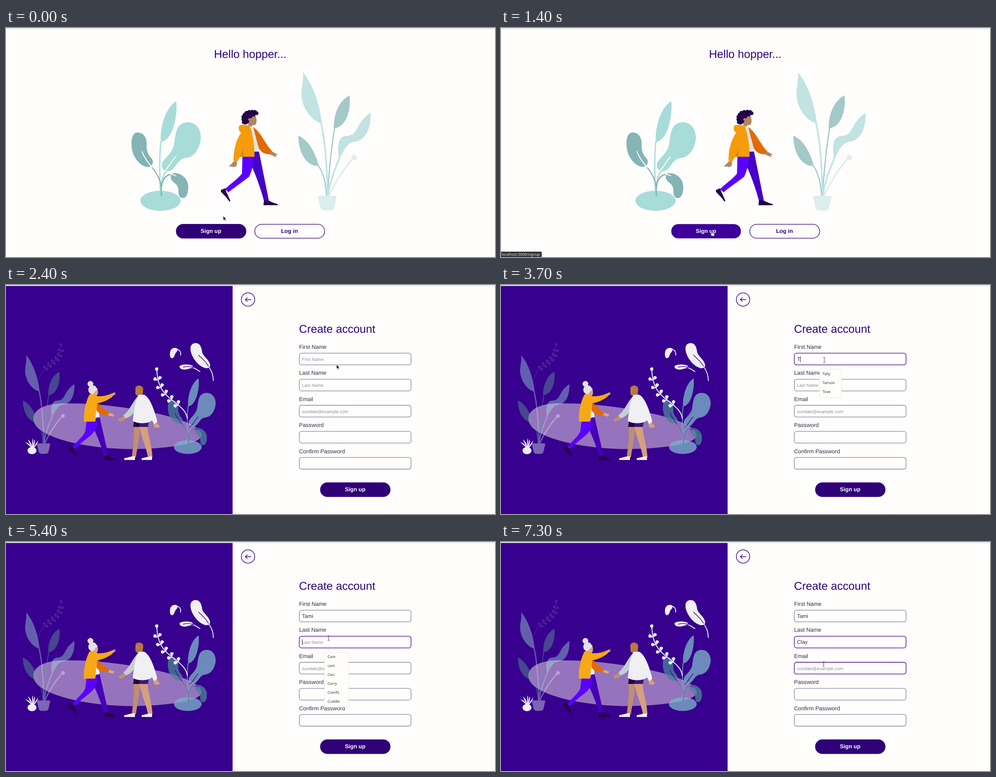
Recreate the animation shown at these times as an HTML page. Size 1092x513 px, loop 8000 ms.

```html
<!DOCTYPE html>
<html lang="en">
<head>
<meta charset="utf-8">
<title>Sign up flow</title>
<style>
html, body { margin: 0; width: 100%; height: 100%; overflow: hidden; background: #fffefd; }
svg { display: block; width: 1092px; height: 513px; font-family: "Liberation Sans", Arial, sans-serif; text-rendering: geometricPrecision; }
.title { font-size: 25.15px; fill: #300077; }
.label { font-size: 12.55px; fill: #2b2d42; }
.value { font-size: 11.85px; fill: #2b2d42; }
.hint { font-size: 9.87px; fill: #8b8f9d; }
.btn { font-size: 12.55px; font-weight: bold; text-anchor: middle; }
.small { font: 8.3px "Noto Sans", sans-serif; }
.line { fill: none; stroke-linecap: round; }
.home { --light: #a8dcd9; --deep: #84b4b4; --gap: #fffefd; --leaf: #c1e3e2; --dark: #a4c9c9; }
.join { --light: #7bb1c8; --deep: #4a829a; --gap: #37008e; --leaf: #9fe4d9; --dark: #5ba896; }
.lf { fill: var(--light); } .ls { stroke: var(--light); }
.df { fill: var(--deep); } .ds { stroke: var(--deep); }
.gs { stroke: var(--gap); }
.pf { fill: var(--leaf); } .ps { stroke: var(--leaf); }
.qf { fill: var(--dark); } .qs { stroke: var(--dark); }
</style>
</head>
<body>
<svg id="stage" viewBox="0 0 1092 513">
<defs>
  <g id="bush">
    <g class="line">
      <path class="ls" stroke-width="2.8" d="M346 254C342 285 343 325 345 372M360 318C350 330 346 342 346 372"/>
      <path class="ds" stroke-width="2.6" d="M322 307C334 321 345 338 346 355"/>
    </g>
    <ellipse class="lf" cx="345" cy="387" rx="45" ry="22.5"/>
    <path class="lf" d="M380 164C384 190 374 252 346 255C343 240 350 182 380 164Z"/>
    <path class="lf" d="M406 211C426 212 436 228 435 248C433 270 420 289 403 291C385 292 382 309 370 318C362 324 347 321 348 306C350 292 370 284 375 262C379 245 376 212 406 211Z"/>
    <path class="df" d="M293 234C306 234 314 244 314 258C313 274 317 284 325 292C331 300 327 310 318 311C306 312 292 300 285 284C278 268 277 235 293 234Z"/>
    <path class="df" d="M376 325C392 325 407 338 407 355C407 370 403 381 395 381C386 381 385 372 385 362C384 346 367 346 368 333C368 328 372 325 376 325Z"/>
    <g class="line">
      <path class="gs" stroke-width="2" d="M378 289C368 300 363 313 352 323M304 277C308 290 318 302 326 312"/>
      <path class="ds" stroke-width="2.8" d="M347 376C345 348 351 329 370 328"/>
      <path class="gs" stroke-width="2" d="M368 328Q374 328 379 331"/>
    </g>
  </g>
  <g id="potted">
    <g class="line" stroke-width="3.6">
      <path stroke="#dceeed" d="M774 293C755 315 735 345 721 376"/>
      <path class="qs" stroke-width="2.6" d="M734 222C728 260 722 310 719 362M696 307C707 320 714 345 716 376"/>
      <path class="ps" d="M703 210C712 250 717 305 718 376M745 290C731 325 722 350 719 376"/>
    </g>
    <path class="pf" d="M663 99C681 120 701 165 705 213C685 211 657 178 660 142C661 128 665 115 663 99Z"/>
    <path class="qf" d="M767 151C771 178 762 222 732 225C731 198 741 164 767 151Z"/>
    <path class="pf" d="M814 190C815 222 806 252 776 255C764 257 756 270 744 294C740 272 739 247 757 242C790 242 776 216 814 190Z"/>
    <path class="qf" d="M653 241C672 250 690 273 698 309C672 311 652 279 653 241Z"/>
    <g fill="#dceeed">
      <circle cx="778" cy="290" r="6"/>
      <path d="M699 376H736Q739 377 738 380L733 402Q731 409 724 409H711Q704 409 702 402L697 380Q696 377 699 376Z"/>
    </g>
  </g>
  <path id="arrow" d="M0 0V10.2L2.4 8L4 11.7L5.8 10.9L4.2 7.3H7.4Z" fill="#222" stroke="#fff" stroke-width=".8"/>
  <path id="beam" d="M-2.3-5.4H-.6L0-4.8L.6-5.4H2.3M0-4.8V4.8M-2.3 5.4H-.6L0 4.8L.6 5.4H2.3" fill="none" stroke="#444"/>
  <path id="hand" d="M0 0Q1.3-1.4 2 .5V4L6 5Q7 5.5 6.6 8L5.6 11H.8L-2 7Q-2.5 5 0 6.2Z" fill="#fff" stroke="#333" stroke-width=".7"/>
</defs>

<g id="home" class="home">
  <text class="title" x="545.5" y="67" text-anchor="middle">Hello hopper...</text>
  <use href="#bush"/>
  <use href="#potted"/>
  <g id="walker">
    <path fill="#4600c8" d="M551 277H565L587 387H576C569 360 558 330 548 308Z"/>
    <path fill="#5a00ff" d="M528 287H555C553 302 548 325 543 333C528 345 511 356 497 368L489 361C501 349 519 337 527 326Z"/>
    <path fill="#240046" d="M480 363L489 359L492 367L501 387L499 389C493 380 487 374 480 367ZM576 386L588 387C594 391 603 393 607 395V397H575Z"/>
    <path fill="#dfe3e6" d="M545 219L552 223L567 277H553Z"/>
    <path fill="#e36a00" d="M552 222C571 235 577 258 595 277L589 283C574 283 565 274 563 264Z"/>
    <path fill="#b08763" d="M593 276L606 283V285L601 284L605 289L600 288L589 283ZM509 298L516 301L515 309L508 312C505 309 501 311 497 310L503 305ZM542 204L556 193C560 203 561 211 557 217L550 218L549 221L541 219Z"/>
    <path fill="#f59c0a" d="M521 219C526 215 541 217 545 221C552 240 555 265 555 288.500H523L515 301L508 297C508 272 515 248 525 235C519 230 519 222 521 219Z"/>
    <path fill="#dc8814" d="M528 271L532 288.500H522C525 284 527 278 528 271Z"/>
    <g id="curls" fill="#240046"></g>
    <circle cx="544" cy="205" r="3" fill="#b08763"/>
  </g>
  <g id="homeBtn">
    <rect id="homeFill" x="379.5" y="439" width="157" height="32.500" rx="16"/>
    <text class="btn" x="457.8" y="459" fill="#fff">Sign up</text>
  </g>
  <rect x="555.600" y="439.600" width="156" height="31.300" rx="15.500" fill="none" stroke="#300077" stroke-width="1.3"/>
  <text class="btn" x="633" y="459" fill="#300077">Log in</text>
</g>

<g id="join" class="join">
  <rect y="2" width="506" height="511" fill="#37008e"/>
  <path fill="#9673bd" d="M61 298C63 275 95 265 130 265C190 265 235 270 280 277C375 292 440 315 437 338C432 358 350 368 270 367.500C200 366 120 352 85 330C70 322 60 310 61 298Z"/>
  <path id="paleStem" class="line" stroke="#50229b" stroke-width="1.2" d="M74 211C80 176 124 178 123 137"/>
  <g id="paleLeaves" fill="#50229b"></g>
  <use href="#potted" opacity=".42" transform="translate(45 157) scale(.714) translate(-663 -99)"/>
  <use href="#bush" opacity=".78" transform="translate(406 363) scale(.69) translate(-345 -387)"/>
  <g fill="#f0eff2">
    <path id="stem" class="line" stroke="#f0eff2" stroke-width="2" style="fill:none" d="M405 299C403 284 392 274 375 261C350 243 338 225 337 193"/>
    <g id="leaves"></g>
    <path d="M366 155C366 144 372 140 380 141C384 143 384 148 379 152C376 157 376 164 370 164C367 163 366 159 366 155Z"/>
    <path d="M424 130C433 130 437 140 438 150C440 160 455 168 456 180C455 187 446 188 440 184C425 178 411 155 412 142C412 134 417 130 424 130Z"/>
    <path d="M388 181C395 177 410 177 417 181C418 186 408 188 403 189C395 191 385 187 388 181Z"/>
    <path d="M57 365L43 352Q52 354 56 362L49 346Q56 351 58 361L59 343Q62 350 60 361L64 345Q66 352 62 362L72 348Q70 358 62 365Z"/>
    <ellipse cx="58" cy="371" rx="10" ry="8"/>
  </g>
  <g class="line" stroke="#f0eff2" stroke-width="1.9">
    <path d="M378 143C388 144 391 150 390 157M451 181C459 191 463 201 463 214M405 183C416 183 425 188 433 194"/>
    <path stroke="#37008e" stroke-width="1.4" d="M430 157C438 165 447 172 452 182M396 184C404 182 411 182 418 185"/>
  </g>
  <g id="elder">
    <path fill="#4600b8" d="M202 296H209L229 383L219 385C213 360 203 337 196 322Z"/>
    <path fill="#5a00ff" d="M180 304H204C204 317 198 329 190 336C178 346 165 355 155 367L148 363C158 350 173 339 177 328Z"/>
    <path fill="#240046" d="M140 364L148 361L158 381L157 385C152 379 146 374 140 368ZM218 383L229 382C234 387 240 387 243 390V392H218Z"/>
    <path fill="#f0eff2" d="M197 266L205 263L209 296L198 298Z"/>
    <path fill="#e36a00" d="M203 264C213 269 219 280 231 286L228 292C216 291 205 288 202 280Z"/>
    <path fill="#d9a588" d="M230 286L242 290L239 295L228 292ZM235 244L245 239L242 243L246 244L237 249ZM194 234H204C207 241 205 247 202 248L199 252L193 246Z"/>
    <path fill="#f6a916" d="M186 246C192 241 199 246 204 249C215 250 228 247 236 243L239 249C228 258 214 264 203 265L199 306H174C173 285 178 262 186 246Z"/>
    <path fill="#e3e1e6" d="M184 236C183 226 192 223 199 226L205 234C199 236 198 243 192 245C187 243 184 240 184 236Z"/>
    <circle cx="188.500" cy="221.500" r="6.500" fill="#e3e1e6"/>
  </g>
  <g id="friend">
    <path fill="#c08f6f" d="M285 317H300C298 342 294 360 290 386H281C283 364 287 345 285 317ZM263 293L267 299C263 305 259 304 256 307L250 302Z"/>
    <path fill="#d5a07c" d="M298 317H316C318 342 326 360 327 386H317C313 362 303 345 298 317ZM329 310L335 306L344 317L339 320L331 319Z"/>
    <path fill="#f0eff2" d="M264 388C272 387 280 383 288 384V392H264ZM303 388C310 387 316 384 326 384V392H303Z"/>
    <path fill="#240046" d="M286 303L302 306L297 318H284Z"/>
    <path fill="#3f157a" d="M302 304H319L317 318H296Z"/>
    <path fill="#c4ced4" d="M296 248C281 262 278 280 262 292L267 299C280 295 288 285 292 272Z"/>
    <path fill="#b87a2c" d="M289 231C290 224 302 223 306 230C307 237 306 241 304 244L298 248C291 249 288 245 289 239Z"/>
    <path fill="#b9785a" d="M289.500 232H297L298 238L295 241L289 240ZM299 236H303L304 241L308 248H297L300 242Z"/>
    <path fill="#f0eff2" d="M296 246H309C321 253 330 275 338 306L331 312L326 303C318 312 290 311 283 304C286 285 287 262 296 246Z"/>
  </g>
  <g class="line" stroke="#37008e" stroke-width="1.4">
    <circle cx="540.500" cy="32.500" r="15"/>
    <path d="M534.500 32.800H547M539 28.500L534.500 32.800L539 37" stroke-linejoin="round"/>
  </g>
  <text class="title" x="654.300" y="106.500">Create account</text>
  <g id="fields"></g>
  <rect x="701.500" y="442.200" width="157" height="32.600" rx="16" fill="#300077"/>
  <text class="btn" x="779.700" y="462.200" fill="#fff">Sign up</text>
  <rect id="caret" width="1" height="13" fill="#222"/>
  <g id="popup"></g>
</g>

<g id="status">
  <path fill="#343434" d="M0 501H89Q91 501 91 503V513H0Z"/>
  <text class="small" x="1" y="510" fill="#e4e4e4">localhost:3000/signup</text>
</g>
<rect y="1" width="1092" height="1.200" fill="#d6d6d6"/>
<use id="cursor"/>
</svg>
<script>
const LOOP = 8000, STEP = 100;
const $ = id => document.getElementById(id);
const show = (el, on) => el.style.display = on ? "" : "none";
const latest = (table, t) => table.filter(row => row[0] <= t).pop();
const within = (t, a, b) => t >= a && t < b;

// Curly hair: a ring of bumps around a solid core
$("curls").innerHTML = `<path d="M530 196Q532 187 545 187L560 190L553 195L547 201L541 214L530 213Z"/>` +
  [[531,211],[535,212],[530,205],[530,199],[533,194],[537,190],[543,188],[550,187.500],[556,188],[559.500,191],[553,194],[546,198]]
    .map(([x, y]) => `<circle cx="${x}" cy="${y}" r="4.300"/>`).join("");

function sprig(stem, target, from, count, size) {
  const path = $(stem), len = path.getTotalLength();
  let out = "";
  for (let i = 0; i <= count; i++) {
    const d = len * (from + (0.98 - from) * i / count);
    const p = path.getPointAtLength(d), q = path.getPointAtLength(d - 2);
    const dir = Math.atan2(p.y - q.y, p.x - q.x) * 180 / Math.PI;
    for (const turn of i < count ? [-50, 50] : [0])
      out += `<path transform="translate(${p.x} ${p.y}) rotate(${dir + turn}) scale(${size})" d="M0 0C4-.5 5-4.500 9-4.300C13-3 13 2.500 10 3.900C6 4.500 4 1 0 0Z"/>`;
  }
  $(target).innerHTML = out;
}
sprig("stem", "leaves", 0.28, 5, 0.92);
sprig("paleStem", "paleLeaves", 0.28, 6, 0.68);

const labels = ["First Name", "Last Name", "Email", "Password", "Confirm Password"];
const hints = ["First Name", "Last Name", "sundale@example.com", "", ""];
const top0 = 152.7, pitch = 58.4;
$("fields").innerHTML = labels.map((label, i) => {
  const y = top0 + i * pitch;
  return `<text class="label" x="654.500" y="${y - 9.800}">${label}</text>
    <rect x="655" y="${y}" width="249.500" height="26.200" rx="5" fill="#fffefd" stroke-width="1.3"/>
    <text x="661" y="${y + 17}"></text>`;
}).join("");
const boxes = [...$("fields").querySelectorAll("rect")];
const texts = boxes.map(box => box.nextElementSibling);

// Each row: first step, last step, place reached
const moves = [
  [400, 1000, 470, 455], [1500, 1500, 470, 456], [1800, 2100, 664, 274],
  [2300, 2400, 738, 178], [2500, 2700, 722, 168], [4500, 4600, 722, 194],
  [4700, 4900, 720.5, 214.500], [5100, 5100, 720.5, 215.500], [6900, 7300, 720.5, 273.500]
];
const pointers = [[0, "arrow"], [700, "hand"], [1500, "arrow"], [2600, "beam"],
  [4500, "arrow"], [4800, "beam"], [7000, "arrow"], [7200, "beam"]];
const typed = [
  [[0, ""], [3700, "T"], [3900, "Ta"], [4000, "Tam"], [4200, "Tami"]],
  [[0, ""], [5900, "C"], [6100, "Cl"], [6200, "Cla"], [6500, "Clay"]]
];
const active = [[[2500, 5400]], [[4600, LOOP]], [[7200, LOOP]], [], []];
const carets = [[0, 2900, 4500], [1, 5400, 5700], [1, 5900, 6900]];
const popups = [
  [2900, 3700, 0, 49, "Ada,Lina,Orla,Tally,Tamsin,Tove"],
  [3700, 4200, 0, 49, "Tally,Tamsin,Tove"],
  [5400, 6200, 1, 54, "Cam,cam,Cari,Carry,Comfit,Cuddle"]
];

function pointerAt(t) {
  let x = 485, y = 421;
  for (const [a, b, toX, toY] of moves) {
    if (t < a) break;
    const p = Math.min(1, (t - a + STEP) / (b - a + STEP));
    x += (toX - x) * p;
    y += (toY - y) * p;
  }
  return [x, y];
}

function drawPopup(t) {
  const row = popups.find(([a, b]) => within(t, a, b));
  show($("popup"), row);
  if (!row) return;
  const [, end, field, width, names] = row;
  const list = names.split(","), y = top0 + field * pitch + 36;
  const bottom = y + list.length * 20 + 3;
  const fading = end !== 3700 && t >= end - STEP;
  $("popup").setAttribute("opacity", fading ? 0.45 : 1);
  $("popup").innerHTML =
    `<path d="M711 ${y}H716L721 ${y - 5}L726 ${y}H${711 + width}V${bottom}H711Z" fill="#fffefb" stroke="#ddd" stroke-width=".7"/>` +
    list.map((name, i) => `<text class="small" x="718" y="${y + 13 + i * 19.900}" fill="#333">${name}</text>`).join("");
}

function render(t) {
  const joined = t >= 1500;
  show($("home"), !joined);
  show($("join"), joined);
  show($("status"), within(t, 900, 1900));
  $("homeFill").setAttribute("fill", t < 700 ? "#300077" : t < 800 ? "#370088" : "#3d0098");
  $("homeBtn").setAttribute("transform", t < 1300 ? "" : "translate(458 455) scale(.99) translate(-458 -455)");

  boxes.forEach((box, i) => {
    const on = active[i].some(([a, b]) => within(t, a, b));
    box.setAttribute("stroke", on ? "#37008e" : "#7d8798");
    const value = typed[i] ? latest(typed[i], t)[1] : "";
    texts[i].textContent = value || hints[i];
    texts[i].setAttribute("class", value ? "value" : "hint");
  });

  const caret = carets.find(([, a, b]) => within(t, a, b));
  show($("caret"), caret);
  if (caret) {
    const i = caret[0], empty = !latest(typed[i], t)[1];
    $("caret").setAttribute("x", 661 + (empty ? 0 : Math.floor(texts[i].getComputedTextLength())));
    $("caret").setAttribute("y", Math.round(top0 + i * pitch + 7));
  }
  drawPopup(t);

  const [x, y] = pointerAt(t);
  $("cursor").setAttribute("href", "#" + latest(pointers, t)[1]);
  $("cursor").setAttribute("transform", `translate(${x} ${y})`);
}

const start = performance.now();
let last = -1;
function tick() {
  const t = Math.floor((performance.now() - start) % LOOP / STEP) * STEP;
  if (t !== last) render(last = t);
  requestAnimationFrame(tick);
}
tick();
</script>
</body>
</html>
```
